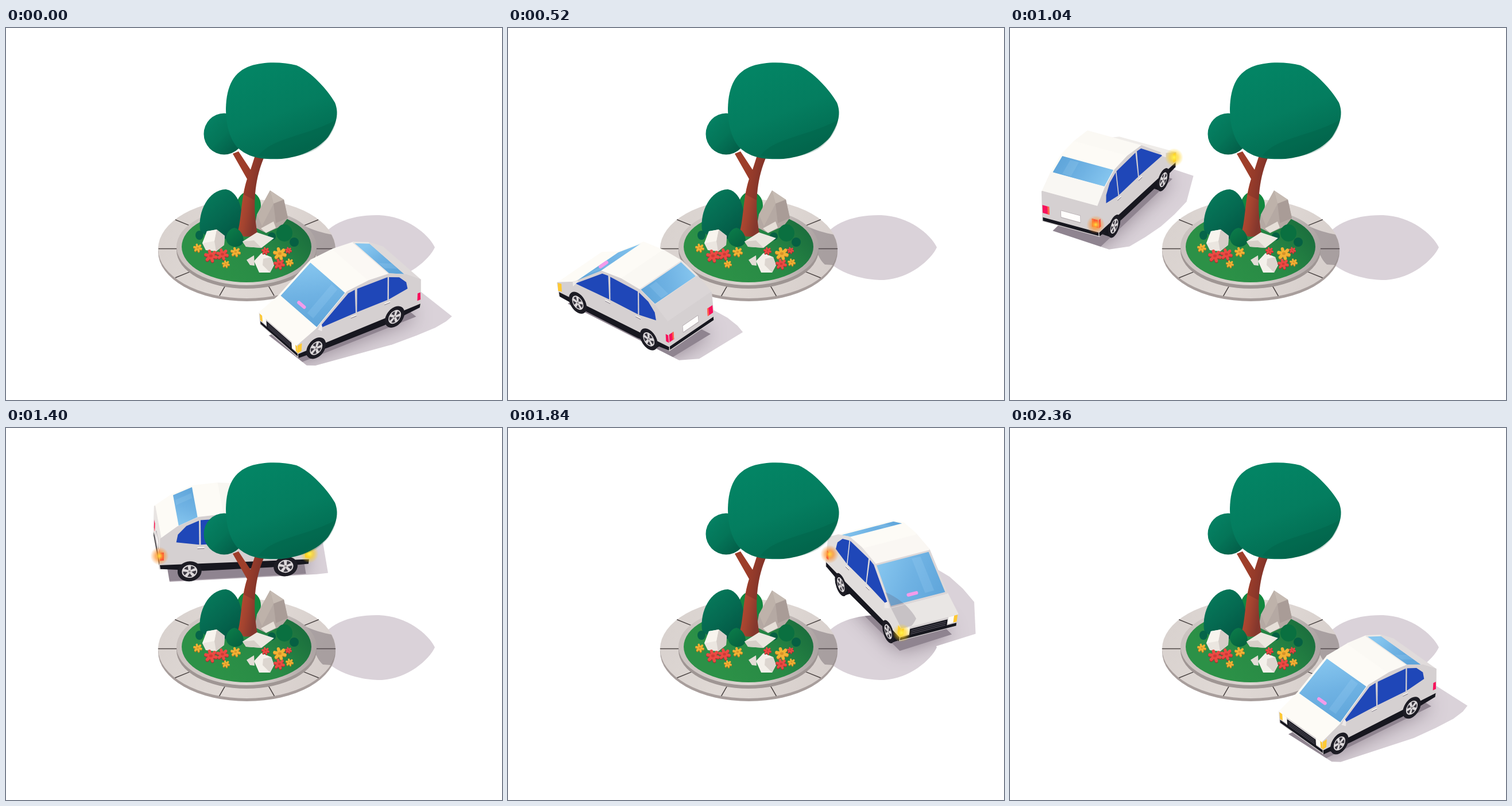
An HTML page with a canvas that plays this animation: 864 px wide and 648 px high, repeating every 2.4 s.

```html
<!DOCTYPE html>
<html lang="en">
<head>
<meta charset="utf-8">
<title>Car circling a roundabout</title>
<style>
  html, body { margin: 0; width: 100%; height: 100%; overflow: hidden; background: #fff; }
  canvas { display: block; width: 864px; height: 648px; }
</style>
</head>
<body>
<canvas width="864" height="648"></canvas>
<script>
const ctx = document.querySelector('canvas').getContext('2d');
const TAU = Math.PI * 2, RAD = Math.PI / 180;
const LOOP = 2400, STEP = 40;
const DEPTH = 0.56, RISE = 0.83;            // ground and height foreshortening
const CENTER = [418, 390], ORBIT = 284, ROLL = 0.06;
const SHADE = '#dad2d9', GLASS = '#1f47b8', DARK = '#17171f';

// ---------- drawing helpers ----------
function fill(shape, color) {
  ctx.fillStyle = color;
  ctx.fill(new Path2D(shape));
}
function ellipse(x, y, rx, ry, color) {
  ctx.beginPath();
  ctx.ellipse(x, y, rx, ry, 0, 0, TAU);
  ctx.fillStyle = color;
  ctx.fill();
}
function trace(points) {
  ctx.beginPath();
  points.forEach(p => ctx.lineTo(p[0], p[1]));
  ctx.closePath();
}
function poly(points, color, edge) {
  trace(points);
  ctx.fillStyle = color;
  ctx.fill();
  if (edge) {
    ctx.strokeStyle = color;
    ctx.lineWidth = edge;
    ctx.lineJoin = 'round';
    ctx.stroke();
  }
}
function gradient(x0, y0, x1, y1, ...colors) {
  const g = ctx.createLinearGradient(x0, y0, x1, y1);
  colors.forEach((c, i) => g.addColorStop(i / (colors.length - 1), c));
  return g;
}
const area = p => p.reduce((sum, [x, y], i) => {
  const [nx, ny] = p[(i + 1) % p.length];
  return sum + x * ny - nx * y;
}, 0);
function hull(points) {
  points.sort((a, b) => a[0] - b[0] || a[1] - b[1]);
  const half = list => {
    const out = [];
    for (const p of list) {
      while (out.length > 1) {
        const [a, b] = out.slice(-2);
        if ((b[0] - a[0]) * (p[1] - a[1]) - (b[1] - a[1]) * (p[0] - a[0]) > 0) break;
        out.pop();
      }
      out.push(p);
    }
    return out.slice(0, -1);
  };
  return [...half(points), ...half([...points].reverse())];
}

// ---------- island ----------
const TREE_SHADOW = 'M747 382C735 358 698 328 650 326C600 325 556 341 541 380C552 420 610 440 655 439C700 436 737 404 747 382Z';
const CANOPY = 'M383 140C384 100 397 76 426 66C450 58 482 59 506 65C531 76 559 106 573 130C580 148 577 165 561 190C542 213 510 225 480 228C440 230 420 224 402 207C388 190 383 165 383 140Z';
const FLOWERS = [
  [334, 383, 8, 0], [357, 397, 12, 1], [377, 394, 11, 1], [400, 390, 9, 0], [383, 411, 7, 0],
  [452, 388, 7, 1], [477, 393, 12, 0], [492, 387, 6, 1], [476, 411, 10, 1], [494, 408, 7, 0]
];

function flower(x, y, r, red) {
  const petals = (dy, color) => {
    ctx.strokeStyle = color;
    ctx.lineWidth = r * 0.45;
    ctx.lineCap = 'round';
    ctx.beginPath();
    for (let i = 0; i < 6; i++) {
      const a = i * TAU / 6 + 0.25;
      ctx.moveTo(x, y + dy);
      ctx.lineTo(x + Math.cos(a) * r * 0.78, y + dy + Math.sin(a) * r * 0.72);
    }
    ctx.stroke();
  };
  petals(1.5, red ? '#a92e31' : '#b27a22');
  petals(0, red ? '#ea4a43' : '#f2b234');
  ellipse(x, y, r * 0.25, r * 0.2, red ? '#cf3a36' : '#d8932a');
}

function drawPavement() {
  ellipse(419.5, 389.5, 154.5, 86.5, '#a89e9c');
  ellipse(419.5, 384.5, 154.5, 86.5, gradient(265, 320, 560, 450, '#d8d1ce', '#e0d9d5', '#d6cecb'));
  ctx.lineWidth = 1.6;
  ctx.strokeStyle = '#4d4645';
  ctx.beginPath();
  for (let i = 0; i < 10; i++) {
    const c = Math.cos(i * 36 * RAD), s = Math.sin(i * 36 * RAD);
    ctx.moveTo(419.5 + c * 120, 384.5 + s * 67);
    ctx.lineTo(419.5 + c * 154, 384.5 + s * 86);
  }
  ctx.stroke();
  ctx.save();
  ctx.beginPath();
  ctx.ellipse(419.5, 386, 154.5, 87, 0, 0, TAU);
  ctx.clip();
  fill('M522 346C545 356 562 359 580 362V414L552 412C538 400 532 372 522 346Z', 'rgba(90,80,88,.38)');
  ctx.restore();
  ellipse(419, 387, 122, 67, '#9f9694');
  ellipse(419, 381, 122, 67, gradient(297, 0, 541, 0, '#c9c1be', '#ddd6d2', '#aca3a2'));
  ellipse(419, 381, 113, 62, gradient(380, 440, 510, 330, '#2c9147', '#288a45', '#1a6d3d'));
}

function drawPlants() {
  ellipse(423, 309, 21, 24, '#12873f');
  fill('M338 352C334 320 352 282 383 281C408 285 418 330 407 360C385 372 350 370 338 352Z',
    gradient(345, 290, 405, 360, '#067a5b', '#056a51', '#035744'));
  // Large boulder
  fill('M433 347L437 325L460 283L484 299L491 331L480 345L453 357Z', '#b5a9a3');
  fill('M460 283L484 299L466 306Z', '#c6bbb3');
  fill('M466 306L484 299L491 331L470 340Z', '#a99c97');
  fill('M437 325L460 283L466 306L446 345Z', '#beb2aa');
  fill('M444 349L466 337L470 348L453 357Z', '#e6dfd8');

  fill('M403 358C411 330 409 296 420 263L395 219L405 215L426 247L434 222L450 224C435 258 428 302 438 358Q420 369 403 358Z',
    gradient(406, 300, 438, 306, '#b84b30', '#a2432f', '#84372d'));
  fill('M414 290C416 278 417 272 420 263L395 219L405 215L426 247L434 222L450 224C440 248 435 270 433 300Z', 'rgba(110,38,34,.35)');

  ellipse(485, 357, 14, 15, '#0a7040');
  ellipse(502, 373, 8, 8, '#066043');
  ellipse(463, 363, 7, 7, '#066043');
  ellipse(337, 361, 7, 8, '#066549');
  fill('M383 368C383 357 391 349 398 348C407 350 414 360 414 371C410 385 387 385 383 368Z',
    gradient(388, 350, 410, 380, '#0b7b49', '#05613f'));
  // Pale rocks
  fill('M342 375L350 354L367 351L381 362L380 378L366 389L348 387Z', '#ebe6e0');
  fill('M367 351L381 362L380 378L366 389L363 371Z', '#d5cdc8');
  fill('M350 354L367 351L363 371L342 375Z', '#f8f4ee');
  fill('M412 372L437 356L467 366L445 383L418 381Z', '#ece7e0');
  fill('M412 372L432 370L445 383L418 381Z', '#d8d0c9');
  fill('M419 404L432 396L433 414L425 413Z', '#e3dcd6');
  fill('M432 406L445 392L462 399L467 413L460 426L441 426Z', '#f4f0ea');
  fill('M462 399L467 413L460 426L447 413L448 402Z', '#dcd5cf');
  FLOWERS.forEach(f => flower(...f));

  ellipse(380, 184.5, 35.5, 36, gradient(350, 160, 405, 215, '#058163', '#047558', '#035c47'));
  fill(CANOPY, gradient(440, 70, 500, 230, '#038464', '#047d5f', '#02694f'));
  fill('M440 222C465 190 520 190 575 160C573 178 560 198 540 211C510 228 470 230 440 222Z', 'rgba(0,82,62,.22)');
}

// ---------- car: a side profile of [along, up] points, extruded across ----------
const PROFILE = [[124, 22], [127, 48], [87, 68], [22, 121], [-25, 126], [-68, 123], [-104, 107], [-134, 85], [-136, 26]];
const [FRONT, HOOD, WINDSHIELD, , , REAR_GLASS, , BACK] = PROFILE.keys();
const SIDE_GLASS = [
  [[84, 67], [20, 117], [6, 119], [4, 70]],
  [[1, 70], [1, 119], [-64, 118], [-64, 70]],
  [[-67, 70], [-67, 117], [-89, 108], [-104, 92], [-107, 77]]
];
const halfWidth = w => 57 - Math.max(0, w - 70) * 0.05;

function paint(nx, ny, nz) {
  const n = Math.hypot(nx, ny, nz);
  const k = Math.min(1, Math.max(0.2, 1.6 * (-0.55 * nx - 0.1 * ny + 0.83 * nz) / n - 0.33));
  const mix = (a, b) => Math.round(a + (b - a) * k);
  return `rgb(${mix(203, 253)},${mix(197, 251)},${mix(200, 246)})`;
}

function makeCar(t) {
  const a = (144.6 + t * 0.15) * RAD;
  const hx = Math.cos(a), hy = Math.sin(a), lx = hy, ly = -hx;
  const ox = CENTER[0] + ORBIT * lx + 7 * hx;
  const oy = CENTER[1] + (ORBIT * ly + 7 * hy) * DEPTH;
  const ground = (u, v) => [ox + u * hx + v * lx, oy + (u * hy + v * ly) * DEPTH];
  const at = (u, v, w, roll = ROLL) => {
    const [x, y] = ground(u, v + roll * w);
    return [x, y - RISE * (w - roll * v)];
  };
  const cast = (u, v, w) => {
    const [x, y] = ground(u, v + ROLL * w);
    return [x + 0.65 * w, y - 0.05 * w];
  };

  // Patch on the strip after profile point i: a0..a1 along it, b0..b1 across it
  const patch = (i, a0, a1, b0, b1) => [[a0, b1], [a1, b1], [a1, b0], [a0, b0]].map(([f, b]) => {
    const [p, q] = [PROFILE[i], PROFILE[i + 1]];
    const w = p[1] + (q[1] - p[1]) * f;
    return at(p[0] + (q[0] - p[0]) * f, b * halfWidth(w), w);
  });
  const facing = i => area(patch(i, 0, 1, -1, 1)) < 0;
  const onSide = (side, pts) => pts.map(([u, w]) => at(u, side * halfWidth(w), w));
  const sideSeen = side => area(onSide(side, PROFILE)) * side > 0;

  function disc(u, v, draw) {
    ctx.save();
    ctx.transform(hx, hy * DEPTH, 0, -RISE, ...at(u, v, 20, 0));
    draw();
    ctx.restore();
  }
  function wheel(u, side, face) {
    for (let v = 36; v <= 55; v += 3) disc(u, side * v, () => face || ellipse(0, 0, 20, 20, DARK));
    if (!face) return;
    disc(u, side * 55, () => {
      ellipse(0, 0, 21, 21, '#1d1c24');
      ellipse(0, 0, 13.5, 13.5, '#dcd8da');
      ctx.rotate(-t * 0.037);
      for (let i = 0; i < 5; i++) {
        ctx.rotate(TAU / 5);
        fill('M3.5 0L10.5 -4.2Q12.5 0 10.5 4.2Z', '#3b3841');
      }
      ellipse(0, 0, 2.2, 2.2, '#8b868a');
    });
  }

  function drawSide(side) {
    poly(onSide(side, PROFILE), paint(side * lx, side * ly, -ROLL * side), 2.5);
    poly(onSide(side, [[124, 20], [125, 29], [-136, 33], [-135, 25], [-60, 17], [60, 17]]), DARK);
    SIDE_GLASS.forEach(g => poly(onSide(side, g), GLASS));
    poly(onSide(side, [[127, 31], [127, 48], [118, 50], [118, 33]]), '#ffc933');
    poly(onSide(side, [[-136, 42], [-135, 58], [-129, 58], [-129, 42]]), '#f7125c');
    for (const u of [14, -58]) {
      poly(onSide(side, [[u, 61], [u - 12, 61], [u - 12, 63], [u, 63]]), '#97909a');
      poly(onSide(side, [[u, 63], [u - 12, 63], [u - 12, 65], [u, 65]]), '#fffdf8');
    }
    for (const u of [84, -84]) wheel(u, side, true);
    poly([at(84, side * 57, 66), at(82, side * 65, 67), at(82, side * 65, 77), at(78, side * 57, 75)], '#eee9e7', 1);
  }

  function drawFront() {
    poly(patch(FRONT, 0, 0.25, -1, 1), DARK);
    poly(patch(FRONT, 0.2, 0.76, -0.66, 0.66), DARK);
    ctx.lineWidth = 1;
    ctx.strokeStyle = '#5c5864';
    for (const f of [0.3, 0.45, 0.6]) {
      const p = patch(FRONT, f, f, -0.6, 0.6);
      ctx.beginPath();
      ctx.moveTo(...p[0]);
      ctx.lineTo(...p[2]);
      ctx.stroke();
    }
    for (const s of [-1, 1]) {
      poly(patch(FRONT, 0.35, 0.92, s * 0.68, s * 0.88), '#fffdf8');
      poly(patch(FRONT, 0.35, 0.95, s * 0.88, s), '#ffc933');
    }
  }
  function drawBack() {
    poly(patch(BACK, 0.88, 1, -1, 1), DARK);
    poly(patch(BACK, 0.48, 0.71, -0.34, 0.34), '#b5adb1', 1.5);
    poly(patch(BACK, 0.48, 0.7, -0.34, 0.34), '#fffdfc');
    for (const s of [-1, 1]) {
      poly(patch(BACK, 0.46, 0.73, s * 0.76, s), '#f7125c');
      poly(patch(BACK, 0.46, 0.73, s * 0.76, s * 0.82), '#ff6a4a');
    }
  }
  function drawGlass(i) {
    const p = patch(i, 0.03, 0.95, -0.95, 0.95);
    poly(p, gradient(...p[0], ...p[2], '#5fa5da', '#6fb2e3', '#86c6ef'));
    poly(patch(i, 0.12, 0.9, 0.3, 0.62), 'rgba(190,228,250,.15)');
    if (i === WINDSHIELD) {
      ctx.beginPath();
      ctx.moveTo(...at(75, -14, 76));
      ctx.lineTo(...at(75, 2, 76));
      ctx.strokeStyle = '#f39bea';
      ctx.lineWidth = 6;
      ctx.lineCap = 'round';
      ctx.stroke();
    }
  }
  // The tree's shadow, lifted from the ground to the height of the bonnet
  function treeShade(points) {
    ctx.save();
    trace(points);
    ctx.clip();
    ctx.translate(-36, -50);
    fill(TREE_SHADOW, 'rgba(95,85,105,.25)');
    ctx.restore();
  }
  function glow(point, core, halo) {
    const [x, y] = at(...point);
    const g = ctx.createRadialGradient(x, y, 1, x, y, 16);
    g.addColorStop(0, core);
    g.addColorStop(0.4, halo + 'aa');
    g.addColorStop(1, halo + '00');
    ellipse(x, y, 16, 16, g);
  }

  return {
    behind: oy < CENTER[1],
    drawShadow() {
      const pts = PROFILE.flatMap(([u, w]) => [-1, 1].map(s => cast(u, s * halfWidth(w), w)));
      poly(hull(pts), SHADE);
      // Contact darkening, kept inside the shadows already drawn
      ctx.save();
      ctx.globalCompositeOperation = 'source-atop';
      ctx.shadowColor = 'rgba(100,84,100,.65)';
      ctx.shadowBlur = 36;
      poly([[120, 52], [-132, 52], [-132, -52], [120, -52]].map(p => ground(...p)), '#8f8490');
      ctx.restore();
    },
    draw() {
      for (const side of [-1, 1]) for (const u of [84, -84]) wheel(u, side, false);
      for (let i = 0; i < PROFILE.length - 1; i++) {
        if (!facing(i)) continue;
        const [[u0, w0], [u1, w1]] = [PROFILE[i], PROFILE[i + 1]];
        const nu = w1 - w0, nw = u0 - u1;
        poly(patch(i, 0, 1, -1, 1), paint(nu * hx, nu * hy, nw), 2.5);
        if (i === FRONT) drawFront();
        if (i === BACK) drawBack();
        if (i === WINDSHIELD || i === REAR_GLASS) drawGlass(i);
        if (i === HOOD || i === WINDSHIELD) treeShade(patch(i, 0, 1, -1, 1));
      }
      for (const side of [-1, 1]) if (sideSeen(side)) drawSide(side);
      const blink = t % 600;
      if (blink > 20 && blink < 500) {
        if (facing(BACK) || sideSeen(-1)) glow([-136, -51, 48], '#ffd23c', '#ff8a1e');
        if (facing(FRONT) || sideSeen(-1)) glow([126, -54, 38], '#fff04a', '#ffd21e');
      }
    }
  };
}

function frame(now) {
  const t = Math.floor(now % LOOP / STEP) * STEP;
  const car = makeCar(t);
  ctx.clearRect(0, 0, 864, 648);
  fill(TREE_SHADOW, SHADE);
  car.drawShadow();
  if (car.behind) car.draw();
  drawPavement();
  drawPlants();
  if (!car.behind) car.draw();
  requestAnimationFrame(frame);
}
requestAnimationFrame(frame);
</script>
</body>
</html>
```
